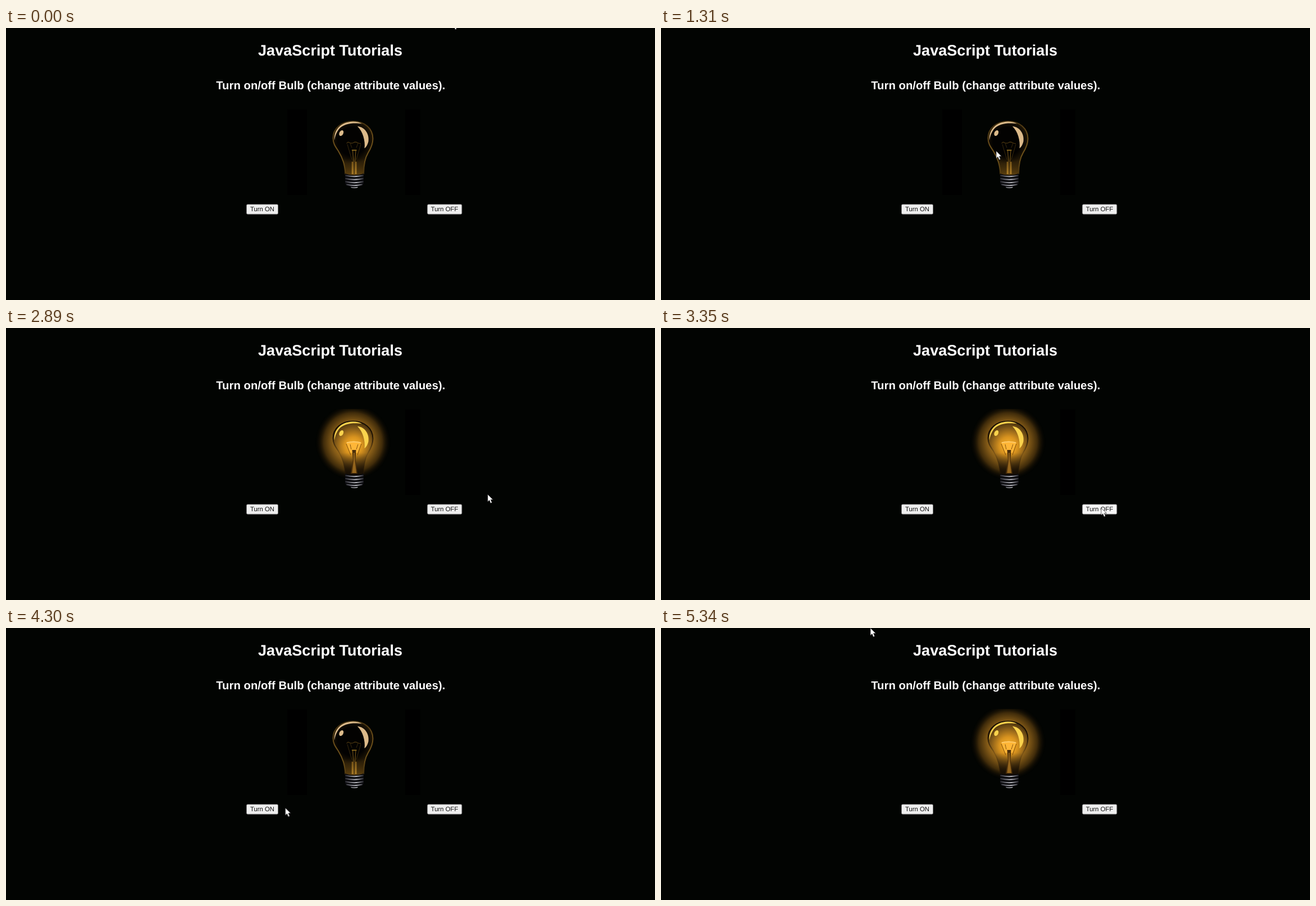
These frames come from a looping animation (1156x484 px, 5.44 s). An HTML page:

```html
<!DOCTYPE html>
<html lang="en">
<head>
<meta charset="utf-8">
<title>Turn on/off Bulb</title>
<style>
  html, body { margin: 0; width: 100%; height: 100%; overflow: hidden; background: #020402; }
  svg { display: block; width: 1156px; height: 484px; }
  text { font-family: "Liberation Sans", Arial, sans-serif; text-anchor: middle; text-rendering: geometricPrecision; }
  .title { font-weight: bold; fill: #fff; }
  .label { font-size: 11.33px; fill: #111; }
  .button { fill: #efefef; stroke: #858585; stroke-width: .85; }

  .lit, .unlit, .button { animation: 5440ms step-end infinite; }
  .lit { animation-name: light; }
  .unlit { animation-name: dark; }
  .on { animation-name: press-on; }
  .off { animation-name: press-off; }
  .cursor { animation: travel 5440ms linear infinite; }

  @keyframes light {
    0%, 62.87% { opacity: 0; }
    36.4%, 85.48%, 100% { opacity: 1; }
  }
  @keyframes dark {
    0%, 62.87% { opacity: 1; }
    36.4%, 85.48%, 100% { opacity: 0; }
  }
  @keyframes press-on {
    0%, 48.5%, 92.6%, 100% { fill: #efefef; }
    28.7%, 36.4%, 80%, 85.48% { fill: #e5e5e5; }
    34.56%, 83.8% { fill: #f7f7f7; }
  }
  @keyframes press-off {
    0%, 71.9%, 100% { fill: #efefef; }
    57.5%, 62.87% { fill: #e4e4e0; }
    61.4% { fill: #f7f7f7; }
  }
  @keyframes travel {
    0%, 20.5% { transform: translate(795px, -13px); }
    24.08% { transform: translate(598px, 218px); animation-timing-function: ease-out; }
    29.04%, 31.4% { transform: translate(455px, 330px); }
    34%, 47.7% { transform: translate(450px, 321px); animation-timing-function: ease-in; }
    49.6% { transform: translate(545px, 336px); }
    51.3% { transform: translate(740px, 318px); animation-timing-function: ease-out; }
    53.13% { transform: translate(858px, 296px); animation-timing-function: ease-in-out; }
    57.9% { transform: translate(795px, 318px); }
    60.6%, 71% { transform: translate(784px, 320px); animation-timing-function: ease-in-out; }
    79.04% { transform: translate(498px, 320px); }
    80.33%, 81.2% { transform: translate(470px, 322px); animation-timing-function: ease-out; }
    83.6%, 91.4% { transform: translate(450px, 322px); animation-timing-function: ease-in-out; }
    98.16%, 100% { transform: translate(373px, 0); }
  }
</style>
</head>
<body>
<svg viewBox="0 0 1156 484">
  <defs>
    <path id="glass" d="M604.5 260C603.500 243 600 232 592 219C586 210 582.500 205 582.500 196C582.500 178 598 166 618 166C639 166 653.500 179 653.500 197C653.500 207 650 214 645 222C639 232 637 243 637 260"/>
    <g id="shine">
      <path d="M585 200C583 183 595 167 618 166.500C625 166.500 630 168 634 170.500C621 168.500 602 169 593 180C588 187 586 193 585 200Z"/>
      <path d="M626 175C640 176 647.500 190 645.500 202C644 208 641 213 638.500 214C639.500 207 638.500 200 636.500 193C634.500 186 631 180 626 175Z"/>
      <ellipse cx="597.300" cy="187" rx="3.500" ry="5.300" transform="rotate(28 597.3 187)"/>
    </g>
    <g id="base">
      <path d="M604 259Q620 265 637 259V278Q634 281 627 282Q626 285 620 285Q614 285 613 282Q606 281 604 278Z" fill="#0b0b0e"/>
      <g fill="none" stroke="url(#metal)" stroke-width="2" stroke-linecap="round">
        <path d="M605 262.500Q620 266 636 262.500M605 268Q620 271.500 636 268M605 273.500Q620 277 636 273.500M607 278.500Q620 282 634 278.500"/>
        <path d="M615 283.500Q620 285 626 283.500" stroke-width="1.500"/>
      </g>
    </g>
    <linearGradient id="metal" gradientUnits="userSpaceOnUse" x1="604" x2="637" y1="0" y2="0">
      <stop stop-color="#2a2a30"/><stop offset=".25" stop-color="#66666e"/>
      <stop offset=".6" stop-color="#b8b8be"/><stop offset="1" stop-color="#28282e"/>
    </linearGradient>
    <linearGradient id="rim" gradientUnits="userSpaceOnUse" x1="600" y1="166" x2="620" y2="262">
      <stop stop-color="#3a2a0c"/><stop offset=".35" stop-color="#6a4d1a"/>
      <stop offset=".7" stop-color="#6e521a"/><stop offset="1" stop-color="#4a3510"/>
    </linearGradient>
    <linearGradient id="neck" gradientUnits="userSpaceOnUse" x1="0" x2="0" y1="232" y2="262">
      <stop stop-color="#4a330c" stop-opacity="0"/><stop offset="1" stop-color="#5c400f"/>
    </linearGradient>
    <linearGradient id="bars" gradientUnits="userSpaceOnUse" x1="0" x2="0" y1="236" y2="260">
      <stop stop-color="#6f4f16"/><stop offset="1" stop-color="#a87a26"/>
    </linearGradient>
    <radialGradient id="rimglow" gradientUnits="userSpaceOnUse" cx="616" cy="202" r="40">
      <stop offset=".62" stop-color="#2c1e06" stop-opacity="0"/><stop offset="1" stop-color="#33240a"/>
    </radialGradient>
    <radialGradient id="halo" gradientUnits="userSpaceOnUse" cx="618" cy="203" r="67">
      <stop stop-color="#f2a728"/><stop offset=".3" stop-color="#c08420"/>
      <stop offset=".55" stop-color="#835a17"/><stop offset=".78" stop-color="#3f2b0a"/>
      <stop offset="1" stop-color="#080501" stop-opacity="0"/>
    </radialGradient>
    <radialGradient id="inner" gradientUnits="userSpaceOnUse" cx="619" cy="210" r="46">
      <stop stop-color="#ffb52c"/><stop offset=".35" stop-color="#d8931f"/>
      <stop offset=".7" stop-color="#805818"/><stop offset="1" stop-color="#38260a"/>
    </radialGradient>
    <linearGradient id="shade" gradientUnits="userSpaceOnUse" x1="0" x2="0" y1="222" y2="262">
      <stop stop-color="#150d03" stop-opacity="0"/><stop offset="1" stop-color="#150d03"/>
    </linearGradient>
    <linearGradient id="edge" gradientUnits="userSpaceOnUse" x1="0" x2="0" y1="166" y2="225">
      <stop stop-color="#150d03"/><stop offset=".45" stop-color="#1d1204"/>
      <stop offset="1" stop-color="#3a260a" stop-opacity=".2"/>
    </linearGradient>
    <clipPath id="photo"><path d="M501 144H738V297H501Z"/></clipPath>
  </defs>

  <rect width="1156" height="484" fill="#020402"/>
  <rect x="711" y="145" width="27" height="152"/>
  <text class="title" x="577.500" y="49.200" font-size="27.100">JavaScript Tutorials</text>
  <text class="title" x="578.300" y="109" font-size="20.320">Turn on/off Bulb (change attribute values).</text>

  <g class="unlit">
    <rect x="501" y="145" width="35" height="152"/>
    <use href="#glass" fill="#030201"/>
    <use href="#glass" fill="url(#rimglow)" opacity=".7"/>
    <path d="M601 232H639L637 262H604Z" fill="url(#neck)"/>
    <use href="#glass" fill="none" stroke="url(#rim)" stroke-width="2"/>
    <use href="#shine" fill="#dcba8a"/>
    <g fill="none" stroke="#463310">
      <path d="M607 205.500Q608 202 612 204T619 204T626 204T632 205.500" stroke-width="1.300"/>
      <path d="M608 207L616 234M632 207L624 234M613 205L616 213M627 205L624 213" stroke-width=".8"/>
      <path d="M616 217.500H624.500" stroke="#94701f" stroke-width="1.800"/>
      <path d="M617.500 218L619 238M623 218L621.500 238" stroke="#6e5018" stroke-width="1.200"/>
      <path d="M615.700 238H619.200V260H615.700ZM621.200 238H624.700V260H621.200Z" fill="url(#bars)" stroke="none"/>
    </g>
    <use href="#base"/>
  </g>

  <g class="lit" clip-path="url(#photo)">
    <circle cx="618" cy="203" r="67" fill="url(#halo)"/>
    <use href="#glass" fill="url(#inner)"/>
    <path d="M593 222H645Q637 240 637 262H604Q603 240 593 222Z" fill="url(#shade)"/>
    <use href="#glass" fill="none" stroke="url(#edge)" stroke-width="2"/>
    <use href="#shine" fill="#fad34d"/>
    <path d="M606 204Q619 199 633 204L626 222H613Z" fill="#ffb638"/>
    <path d="M607 204Q619 201 632 204" fill="none" stroke="#ffd27a" stroke-width="1.500"/>
    <path d="M606 206L614 226M633 206L626 226M613 207L615 216M627 207L624 216" fill="none" stroke="#84530f"/>
    <path d="M616.500 217H623.500L622.500 234L626 259H614L618 234Z" fill="#4b2f0b"/>
    <path d="M619 222H621L621.500 236L624 258H616.500L619 236Z" fill="#94651d"/>
    <use href="#base"/>
  </g>

  <rect class="button on" x="428.500" y="313.900" width="56" height="17.300" rx="1.800"/>
  <text class="label" x="456.500" y="326">Turn ON</text>
  <rect class="button off" x="750.700" y="313.900" width="61.200" height="17.300" rx="1.800"/>
  <text class="label" x="781" y="326">Turn OFF</text>

  <path class="cursor" d="M0 0V13.300L3 10.500L5.100 15.800L7.600 14.700L5.500 9.600H9.500Z" fill="#fff" stroke="#222" stroke-width=".7"/>
</svg>
</body>
</html>
```
